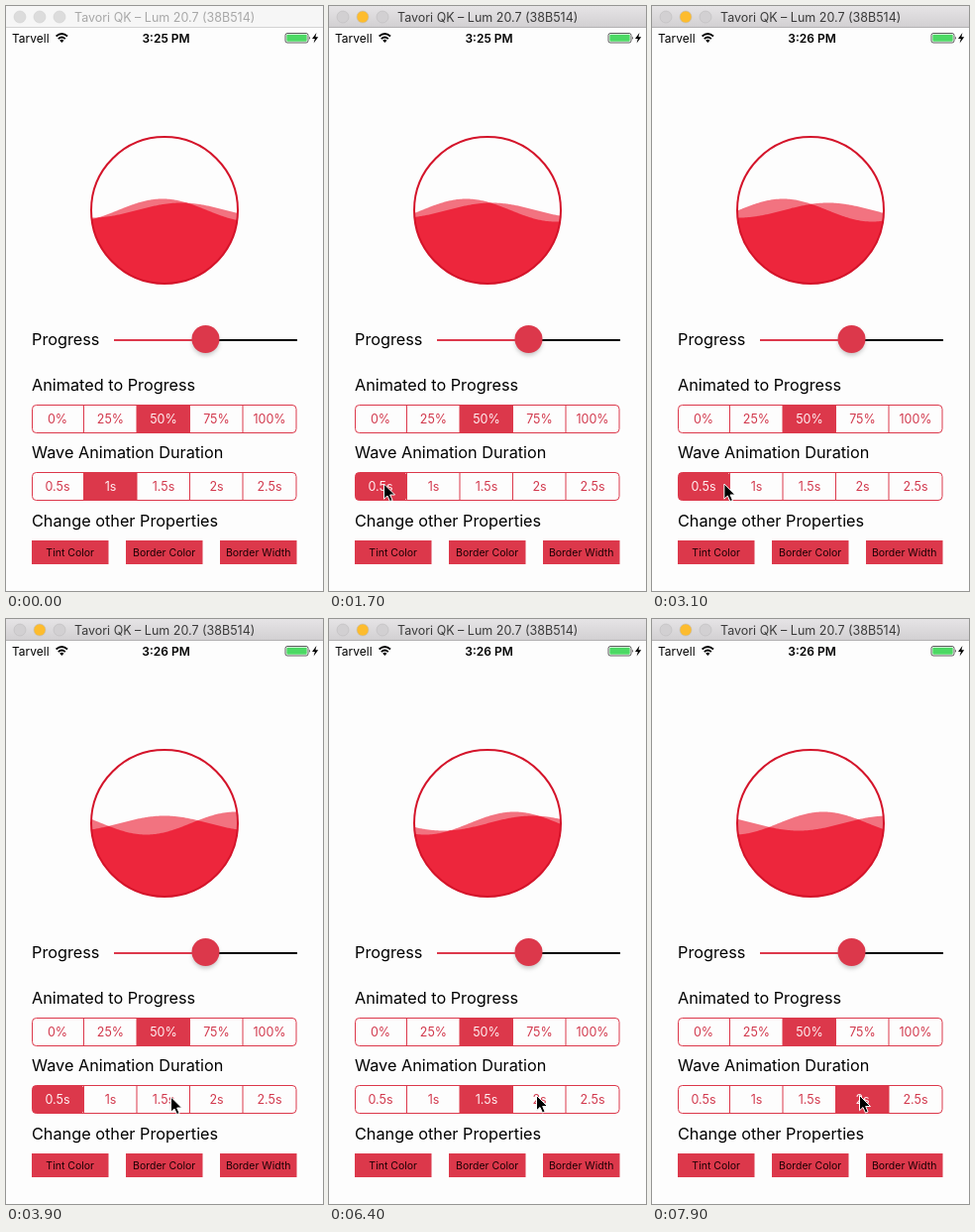
Animation, 320 px wide and 590 px high, one loop 8000 ms. Source, as an HTML page:

```html
<!DOCTYPE html>
<html lang="en">
<head>
<meta charset="utf-8">
<title>Wave progress</title>
<style>
  html, body { margin: 0; width: 100%; height: 100%; overflow: hidden; background: #fdfdfd; }
  svg { display: block; width: 320px; height: 590px; font-family: Inter, Roboto, sans-serif; }
  .label { font-size: 16.25px; fill: #000; }
  .status { font-size: 12px; fill: #000; }
  .seg { font-size: 12.5px; text-anchor: middle; fill: #d23a4e; }
  .seg.on { fill: #fff0f2; }
  .button { font-size: 10.5px; text-anchor: middle; fill: #1c0004; }
  .tint { fill: #dc384b; }
  .line { fill: none; stroke: #dc384b; }
</style>
</head>
<body>
<svg id="stage" viewBox="0 0 320 590">
  <defs>
    <linearGradient id="barFill" x2="0" y2="1">
      <stop offset="0" stop-color="#e6e4e6"/>
      <stop offset="1" stop-color="#d1cfd1"/>
    </linearGradient>
    <clipPath id="bowl"><circle cx="160" cy="206" r="74"/></clipPath>
    <filter id="soft" x="-50%" y="-50%" width="200%" height="200%">
      <feGaussianBlur stdDeviation="2"/>
    </filter>
  </defs>
  <rect width="320" height="590" fill="#fdfdfd"/>

  <g id="titleBar">
    <rect id="bar" width="320" height="22"/>
    <path id="barEdge" d="M0 21.5H320"/>
    <circle class="dot" cx="14" cy="11" r="6"/>
    <circle class="dot" id="middleDot" cx="34" cy="11" r="6"/>
    <circle class="dot" cx="54" cy="11" r="6"/>
    <text id="title" x="69" y="16" font-size="12.5">Tavori QK – Lum 20.7 (38B514)</text>
  </g>

  <g id="statusBar">
    <text class="status" x="6" y="37">Tarvell</text>
    <g fill="none" stroke="#000" stroke-width="1.8">
      <path d="M50.6 30.5Q56.3 25.6 62 30.5"/>
      <path d="M52.8 33.1Q56.3 30 59.8 33.1"/>
    </g>
    <path d="M56.3 37L54.2 34.7Q56.3 33 58.4 34.7Z"/>
    <text class="status" id="clock" x="161.5" y="37" text-anchor="middle" font-weight="600"></text>
    <rect x="282" y="27.5" width="23" height="9.5" rx="2" fill="#fdfdfd" stroke="#333" stroke-width=".8"/>
    <rect x="283.3" y="28.8" width="20.4" height="6.9" rx="1" fill="#4cd964"/>
    <path d="M306 30.6Q307.8 32.2 306 34Z" fill="#333"/>
    <path d="M313.4 27L309 33H311.8L310.6 37.4L315.2 31.2H312.4Z"/>
  </g>

  <g clip-path="url(#bowl)">
    <path id="light" fill="#f27380"/>
    <path id="solid" fill="#ed263c"/>
  </g>
  <circle cx="160" cy="206" r="74" fill="none" stroke="#d4142a" stroke-width="2"/>

  <text class="label" x="26" y="342">Progress</text>
  <path class="line" d="M109 337H201" stroke-width="2"/>
  <path d="M201 337H294" stroke="#000" stroke-width="2"/>
  <circle cx="201.5" cy="339" r="13.5" fill="#777" opacity=".4" filter="url(#soft)"/>
  <circle class="tint" cx="201.5" cy="336" r="14"/>

  <text class="label" x="26" y="388">Animated to Progress</text>
  <g id="levels"></g>
  <text class="label" x="26" y="456">Wave Animation Duration</text>
  <g id="durations"></g>
  <text class="label" x="26" y="525">Change other Properties</text>
  <g id="buttons"></g>

  <path id="cursor" d="M0 0V15.2L3.5 12L6 17.6L8.6 16.5L6.2 11H11Z" fill="#000" stroke="#fff" stroke-width="1"/>
</svg>
<script>
const LOOP = 8000, STEP = 100;
const $ = id => document.getElementById(id);

function add(parent, tag, attrs, text = '') {
  const el = document.createElementNS('http://www.w3.org/2000/svg', tag);
  for (const key in attrs) el.setAttribute(key, attrs[key]);
  el.textContent = text;
  parent.appendChild(el);
  return el;
}

// Segmented control; returns a function that selects one segment.
function segments(parent, top, names) {
  const left = 26.5, right = 293, step = 53.5;
  const edge = i => Math.max(left, 25 + i * step);
  const fill = add(parent, 'rect', { class: 'tint', y: top, height: 28 });
  add(parent, 'rect', { class: 'line', x: left, y: top, width: right - left, height: 28, rx: 4 });
  const labels = names.map((name, i) => {
    if (i) add(parent, 'path', { class: 'line', d: `M${edge(i)} ${top}v28` });
    return add(parent, 'text', { class: 'seg', x: 52 + i * step, y: top + 18.6 }, name);
  });
  return chosen => {
    fill.setAttribute('x', edge(chosen));
    fill.setAttribute('width', edge(chosen + 1) - edge(chosen));
    fill.setAttribute('rx', chosen ? 0 : 4);
    labels.forEach((label, i) => label.classList.toggle('on', i === chosen));
  };
}

segments($('levels'), 402.5, ['0%', '25%', '50%', '75%', '100%'])(2);
const pickDuration = segments($('durations'), 470.5, ['0.5s', '1s', '1.5s', '2s', '2.5s']);

['Tint Color', 'Border Color', 'Border Width'].forEach((name, i) => {
  const x = 26 + i * 95;
  add($('buttons'), 'rect', { class: 'tint', x, y: 539, width: 77.5, height: 24 });
  add($('buttons'), 'text', { class: 'button', x: x + 38.7, y: 554.6 }, name);
});

// Each click picks a duration and restarts both waves at their first crests.
const FIRST = { tall: 131, low: 179 };
const picks = [
  { at: 0, seg: 1, tall: 158, low: 177 },
  { at: 1640, seg: 0, ...FIRST },
  { at: 5050, seg: 2, ...FIRST },
  { at: 6550, seg: 3, ...FIRST }
];

const WAVELENGTH = 180;
const waveY = (x, crest, height) =>
  206 - height * Math.cos((x - crest) * 2 * Math.PI / WAVELENGTH);

// The tall wave drifts right, the low one runs left.
function drawWaves(t, pick) {
  const duration = (pick.seg + 1) / 2, seconds = (t - pick.at) / 1000;
  const tall = pick.tall + WAVELENGTH * seconds / (2.9 * duration);
  const low = pick.low - WAVELENGTH * seconds / (0.3 + 0.855 * duration);
  let upper = 'M84 284', lower = upper;
  for (let x = 84; x <= 236; x++) {
    const a = waveY(x, tall, 11.5), b = waveY(x, low, 7.5);
    upper += `L${x} ${Math.min(a, b).toFixed(2)}`;
    lower += `L${x} ${Math.max(a, b).toFixed(2)}`;
  }
  $('light').setAttribute('d', upper + 'V284Z');
  $('solid').setAttribute('d', lower + 'V284Z');
}

// Pointer moves: start, end, from, to.
const moves = [
  [400, 900, [20, 600], [55.5, 482]],
  [2900, 3700, [55.5, 482], [166.5, 482]],
  [5500, 6200, [166.5, 482], [209.5, 480.5]]
];

function drawCursor(t) {
  let [x, y] = moves[0][2];
  for (const [start, end, from, to] of moves) {
    if (t < start) break;
    const p = Math.min(1, (t - start) / (end - start)), k = p * p * (3 - 2 * p);
    x = from[0] + (to[0] - from[0]) * k;
    y = from[1] + (to[1] - from[1]) * k;
  }
  $('cursor').setAttribute('transform', `translate(${x} ${y})`);
}

function drawWindow(active) {
  $('bar').setAttribute('fill', active ? 'url(#barFill)' : '#f6f6f6');
  $('barEdge').setAttribute('stroke', active ? '#b3b1b3' : '#d3d3d3');
  $('title').setAttribute('fill', active ? '#3a3a3a' : '#a8a8a8');
  document.querySelectorAll('.dot').forEach(dot => {
    dot.setAttribute('fill', active ? '#d2d0d2' : '#dcdcdc');
    dot.setAttribute('stroke', active ? '#bebcbe' : '#d0d0d0');
    dot.setAttribute('stroke-width', .6);
  });
  if (active) $('middleDot').setAttribute('fill', '#fdbc2e');
}

function draw(t) {
  const pick = picks.filter(p => t >= p.at).pop();
  drawWindow(t >= 1600);
  $('clock').textContent = t < 1900 ? '3:25 PM' : '3:26 PM';
  pickDuration(pick.seg);
  drawWaves(t, pick);
  drawCursor(t);
}

const begin = performance.now();
function tick() {
  const t = (performance.now() - begin) % LOOP;
  draw(Math.floor(t / STEP) * STEP);
  requestAnimationFrame(tick);
}
tick();
</script>
</body>
</html>
```
